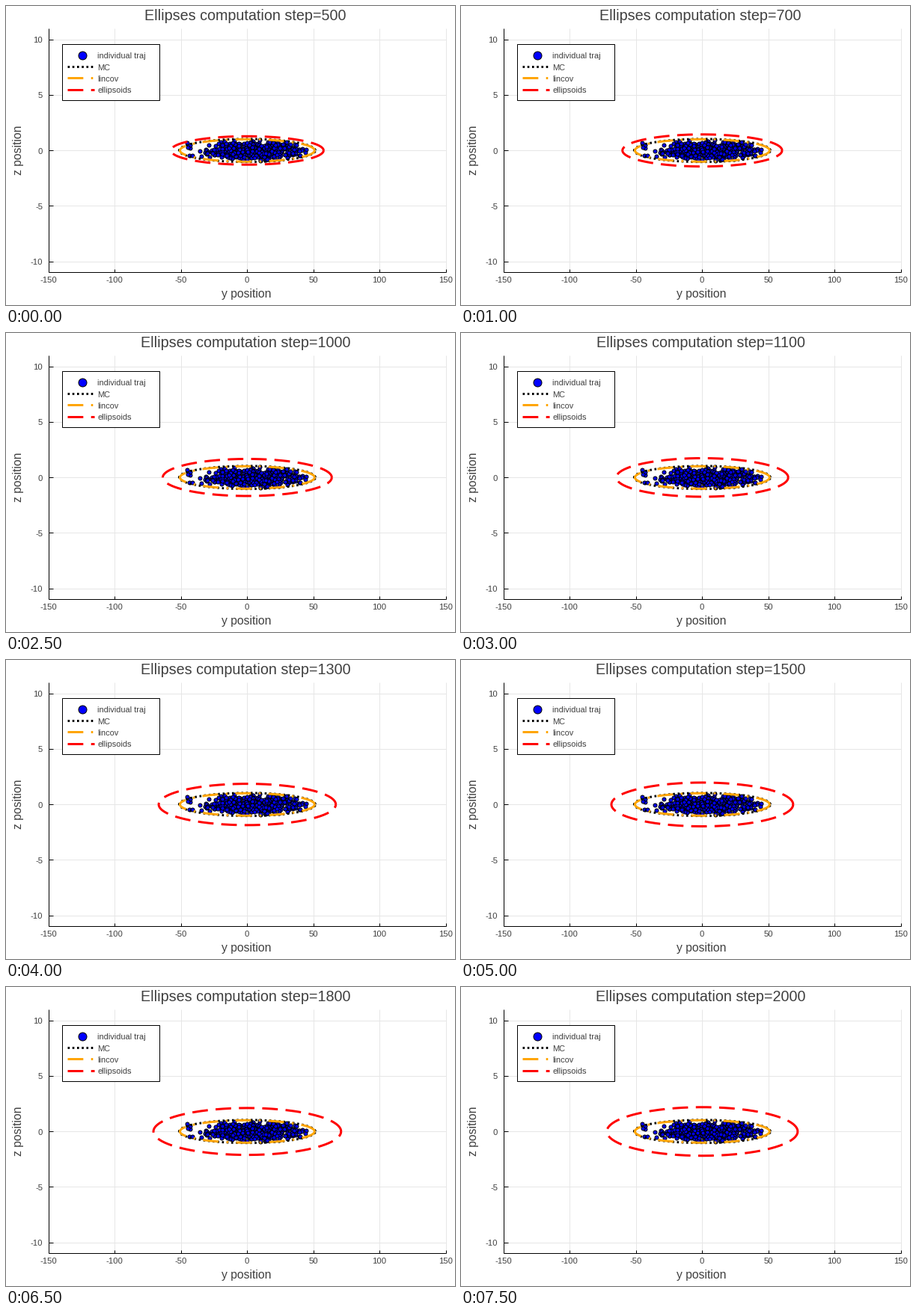
These frames come from a looping animation (600x400 px, 8 s). A matplotlib script:

```python
import numpy as np
import matplotlib as mpl
import matplotlib.pyplot as plt
from matplotlib.animation import FuncAnimation

mpl.rcParams["font.family"] = "Liberation Sans"
mpl.rcParams["lines.scale_dashes"] = False

W, H = 600, 400
LEFT, RIGHT, TOP, BOTTOM = 57.0, 587.8, 30.1, 356.4
CX, CY = (LEFT + RIGHT) / 2, (TOP + BOTTOM) / 2
SX, SY = (RIGHT - LEFT) / 300, (BOTTOM - TOP) / 22
INK = "#404040"
FRAMES, INTERVAL = 16, 500

# Dash patterns in multiples of one unit
UNIT = 2.6
DOT = (0, (UNIT, 1.4 * UNIT))
DASH = (0, (8 * UNIT, 4 * UNIT))
DASHDOT = (0, (8 * UNIT, 4 * UNIT, UNIT, 4 * UNIT))

# 72 dpi makes one point equal one pixel
fig = plt.figure(figsize=(W / 72, H / 72), dpi=72, facecolor="white")
ax = fig.add_axes([0, 0, 1, 1])
ax.set_xlim(0, W)
ax.set_ylim(H, 0)
ax.axis("off")


def px(x):
    return CX + SX * x


def py(y):
    return CY - SY * y


def line(xs, ys, color="black", lw=1, ls="-", z=2):
    return ax.plot(xs, ys, color=color, lw=lw, ls=ls, zorder=z,
                   dash_capstyle="butt", solid_capstyle="butt")[0]


def label(x, y, s, size, ha="center", va="baseline", **kw):
    return ax.text(x, y, s, fontsize=size, color=INK, ha=ha, va=va,
                   zorder=9, **kw)


def dots(xs, ys, size, z):
    ax.plot(xs, ys, "o", ms=size, mfc="blue", mec="black", mew=1, zorder=z)


def ellipse(a, b):
    t = np.linspace(0, 2 * np.pi, 361)
    return CX + a * np.cos(t), CY - b * np.sin(t)


def draw_axes():
    for x in range(-150, 151, 50):
        line([px(x)] * 2, [TOP, BOTTOM], "#e6e6e6", z=1)
        line([px(x)] * 2, [BOTTOM - 4, BOTTOM])
        label(px(x) - 0.3, 370.3, str(x), 11.3)
    for y in range(-10, 11, 5):
        line([LEFT, RIGHT], [py(y)] * 2, "#e6e6e6", z=1)
        line([LEFT, LEFT + 6], [py(y)] * 2)
        label(49.3, py(y) + 4.4, str(y), 11.3, ha="right")
    line([LEFT, LEFT], [TOP, BOTTOM])
    line([LEFT, RIGHT], [BOTTOM, BOTTOM])
    label(321.3, 389.8, "y position", 15.7)
    label(24.5, CY, "z position", 15.7, ha="right", va="center", rotation=90)


def draw_legend():
    ax.add_patch(plt.Rectangle((75, 51.1), 130, 75, fc="white",
                               ec="black", lw=1, zorder=7))
    dots([102.2], [66.2], 11, 8)
    rows = [("individual traj", None, None), ("MC", "black", DOT),
            ("lincov", "orange", DASHDOT), ("ellipsoids", "red", DASH)]
    for i, (name, color, style) in enumerate(rows):
        y = 66.2 + 15.1 * i
        if color:
            line([81.5, 117.8], [y, y], color, 3, style, 8)
        label(122.5, y + 4.2, name, 11, ha="left")


def draw_cloud():
    rng = np.random.default_rng(12)
    x = rng.normal(5, 19, 1000)
    y = rng.normal(0, 0.4, 1000)
    keep = ((x - 5) / 41) ** 2 + (y / 0.98) ** 2 < 1
    stray_x, stray_y = rng.uniform(-46, -34, 7), rng.uniform(-0.6, 0.8, 7)
    dots(px(np.r_[x[keep][:520], stray_x]),
         py(np.r_[y[keep][:520], stray_y]), 5, 3)


draw_axes()
draw_cloud()
line(*ellipse(91, 15.4), "black", 3, DOT, 4)
line(*ellipse(90, 15), "orange", 3, DASHDOT, 5)
outer = line([], [], "red", 3, DASH, 6)
draw_legend()
title = label(320.2, 18.6, "", 19.7)


def update(i):
    u = i / (FRAMES - 1)
    grow = u * (1.43 - 0.43 * u)
    outer.set_data(*ellipse(102 + 25.5 * grow, 19 + 13.5 * grow))
    title.set_text(f"Ellipses computation step={500 + 100 * i}")
    return outer, title


anim = FuncAnimation(fig, update, frames=FRAMES, interval=INTERVAL,
                     repeat=True, repeat_delay=0)
plt.show()
```
